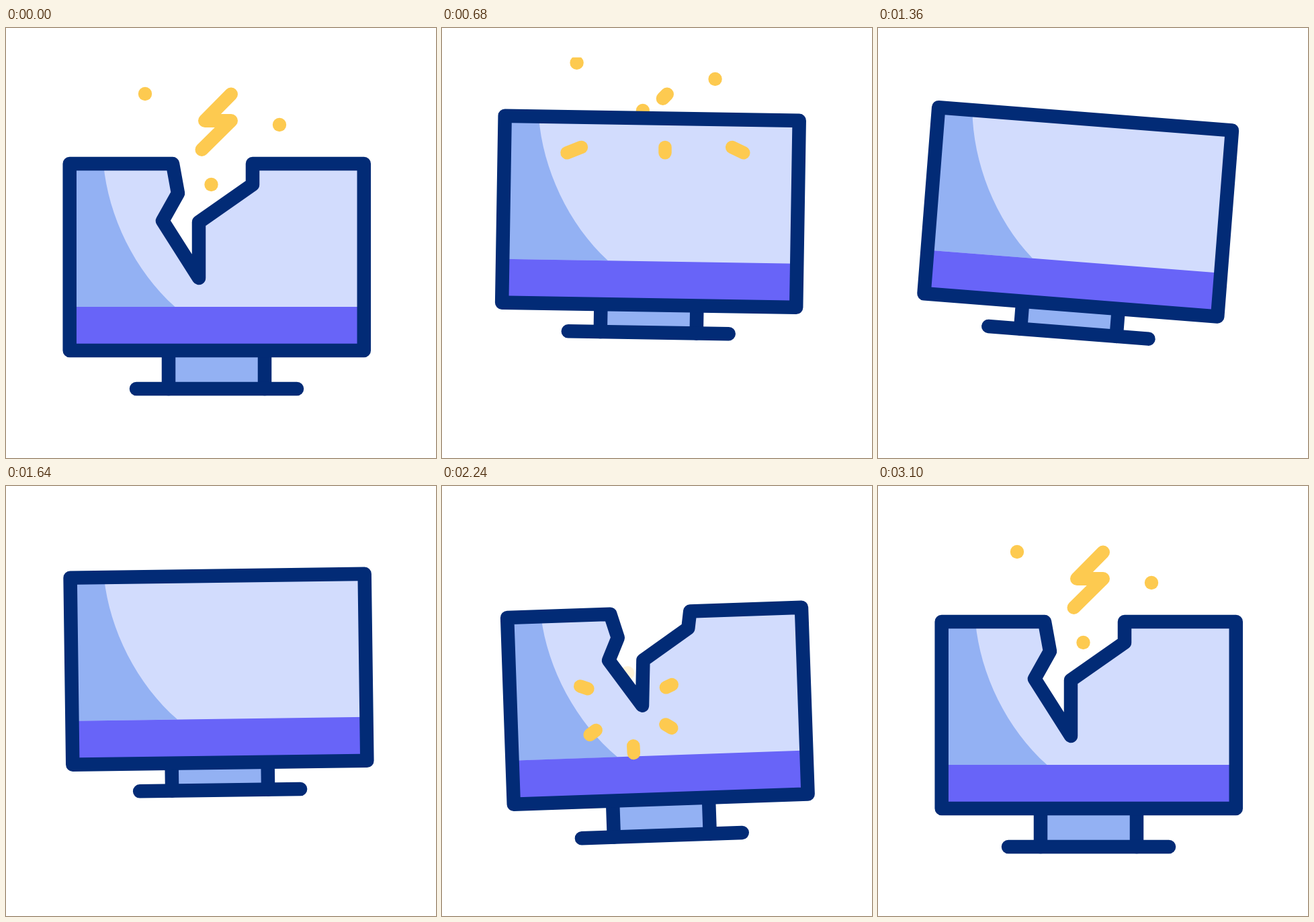
An HTML page with a canvas that plays this animation: 640 by 640 pixels, repeating every 3480 ms.

```html
<!DOCTYPE html>
<html lang="en">
<head>
<meta charset="utf-8">
<title>Broken monitor</title>
<style>
  html, body { margin: 0; width: 100%; height: 100%; overflow: hidden; background: #fff; }
  canvas { display: block; }
</style>
</head>
<body>
<canvas id="stage" width="640" height="640"></canvas>
<script>
const ctx = document.getElementById('stage').getContext('2d');
const LOOP = 3480;
const NAVY = '#022b76', LIGHT = '#d2dcfd', MID = '#93b1f3', PURPLE = '#6864f8', YELLOW = '#fdca50';
const STROKE = 20.5;

const LEFT = 94.7, RIGHT = 532.8, TOP = 202, BOTTOM = 480, SHELF = 415;
const PIVOT = [294.8, 137];
const CRACK = [[248, TOP], [256, 246], [233, 287], [287, 372], [287, 289], [367, 233], [367, TOP]];
const BOLT = [[335, 98.5], [296, 138], [335, 138], [291.5, 181]];
const DOTS = [{ x: 207, y: 98, drift: -14.5 }, { x: 407, y: 144, drift: -1 }, { x: 305.5, y: 233, drift: -15 }];
const DOT_SOURCE = { x: 276, y: 279 };

const mix = (a, b, k) => a + (b - a) * k;
const ramp = (t, a, b) => Math.min(1, Math.max(0, (t - a) / (b - a)));
const ease = (t, a, b) => { const u = ramp(t, a, b); return u * u * (3 - 2 * u); };
const lengthOf = points => points.slice(1).reduce(
  (sum, [x, y], i) => sum + Math.hypot(x - points[i][0], y - points[i][1]), 0);

// four half swings between +5 and -7 degrees, with a soft start and end
function swing(t) {
  const first = 502, half = 458, last = first + 3 * half;
  if (t < first) return 5 * ease(t, 220, first);
  if (t > last) return -7 * (1 - ease(t, last, 2440));
  const i = Math.floor((t - first) / half), from = first + i * half;
  const k = ease(t, from, from + half);
  return i % 2 ? mix(-7, 5, k) : mix(5, -7, k);
}

function line(points, color, width = STROKE) {
  ctx.beginPath();
  points.forEach(([x, y]) => ctx.lineTo(x, y));
  ctx.strokeStyle = color;
  ctx.lineWidth = width;
  ctx.stroke();
}

function box(x, y, right, bottom, color) {
  ctx.fillStyle = color;
  ctx.fillRect(x, y, right - x, bottom - y);
}

function dot(x, y) {
  ctx.beginPath();
  ctx.arc(x, y, 10.2, 0, 2 * Math.PI);
  ctx.fillStyle = YELLOW;
  ctx.fill();
}

function drawDots(t) {
  ctx.save();
  if (t < 1220) {
    const p = ease(t, 220, 1220), rise = 1 - 1.07 * p;
    // the rising edge trims the highest dot
    ctx.beginPath();
    ctx.rect(0, DOTS[0].y * rise - 11 + 3 * Math.min(1, 3 * p), 640, 640);
    ctx.clip();
    DOTS.forEach(({ x, y, drift }) => dot(x + drift * p, y * rise));
  } else if (t > 2200) {
    const p = ease(t, 2200, 3100);
    ctx.globalAlpha = ramp(t, 2200, 2700);
    DOTS.forEach(({ x, y }) => dot(mix(DOT_SOURCE.x, x, p), mix(DOT_SOURCE.y, y, p)));
  }
  ctx.restore();
}

function drawBolt(t) {
  const shown = 1 - ease(t, 220, 760) + ease(t, 2280, 2760);
  if (shown <= 0) return;
  ctx.setLineDash([lengthOf(BOLT) * shown, 999]);
  line(BOLT, YELLOW, 20);
  ctx.setLineDash([]);
}

function drawMonitor(t) {
  // up: lifted, whole and on a short stand; down: landed and cracked
  const up = ease(t, 220, 645) - ease(t, 1903, 2372);
  const base = 537 - 16 * up;

  ctx.save();
  ctx.translate(PIVOT[0], PIVOT[1] - 68 * up);
  ctx.rotate(swing(t) * Math.PI / 180);
  ctx.translate(-PIVOT[0], -PIVOT[1]);

  box(242, BOTTOM, 385, base, MID);
  for (const x of [242, 385]) line([[x, BOTTOM], [x, base]], NAVY);
  line([[194, base], [433, base]], NAVY);

  // whole, the crack points lie evenly along the top edge
  const edge = CRACK.map(([x, y], i) =>
    [mix(x, mix(248, 367, i / (CRACK.length - 1)), up), mix(y, TOP, up)]);
  const frame = new Path2D();
  [[LEFT, TOP], ...edge, [RIGHT, TOP], [RIGHT, BOTTOM], [LEFT, BOTTOM]].forEach(p => frame.lineTo(...p));
  frame.closePath();
  ctx.fillStyle = LIGHT;
  ctx.fill(frame);

  ctx.beginPath();
  ctx.moveTo(LEFT, TOP);
  ctx.lineTo(145, TOP);
  ctx.bezierCurveTo(152, 280, 192, 362, 251.5, SHELF);
  ctx.lineTo(LEFT, SHELF);
  ctx.fillStyle = MID;
  ctx.fill();
  box(LEFT, SHELF, RIGHT, BOTTOM, PURPLE);

  ctx.strokeStyle = NAVY;
  ctx.lineWidth = STROKE;
  ctx.stroke(frame);
  ctx.restore();
}

// short dashes that run outwards along each ray
function drawBurst(t, start, cx, cy, rays) {
  const u = (t - start) / 240;
  if (u <= 0 || u >= 1) return;
  const reach = [ease(u, 0.25, 1), ease(u, 0, 0.75)].map(k => mix(0.835, 1.165, k));
  for (const [dx, dy] of rays) line(reach.map(k => [cx + dx * k, cy + dy * k]), YELLOW, 19.5);
}

const fan = [-135, 0, 108].map(x => [x, 52.5]);
const ring = Array.from({ length: 5 }, (_, i) => {
  const angle = (-25 + 56 * i) * Math.PI / 180, radius = 62 + 3 * i;
  return [radius * Math.cos(angle), radius * Math.sin(angle)];
});

const begin = performance.now();
function tick() {
  const t = (performance.now() - begin) % LOOP;
  ctx.lineCap = ctx.lineJoin = 'round';
  box(0, 0, 640, 640, '#fff');
  drawDots(t);
  drawBolt(t);
  drawMonitor(t);
  drawBurst(t, 560, 332, 129, fan);
  drawBurst(t, 2120, 281.5, 324, ring);
  requestAnimationFrame(tick);
}
tick();
</script>
</body>
</html>
```
